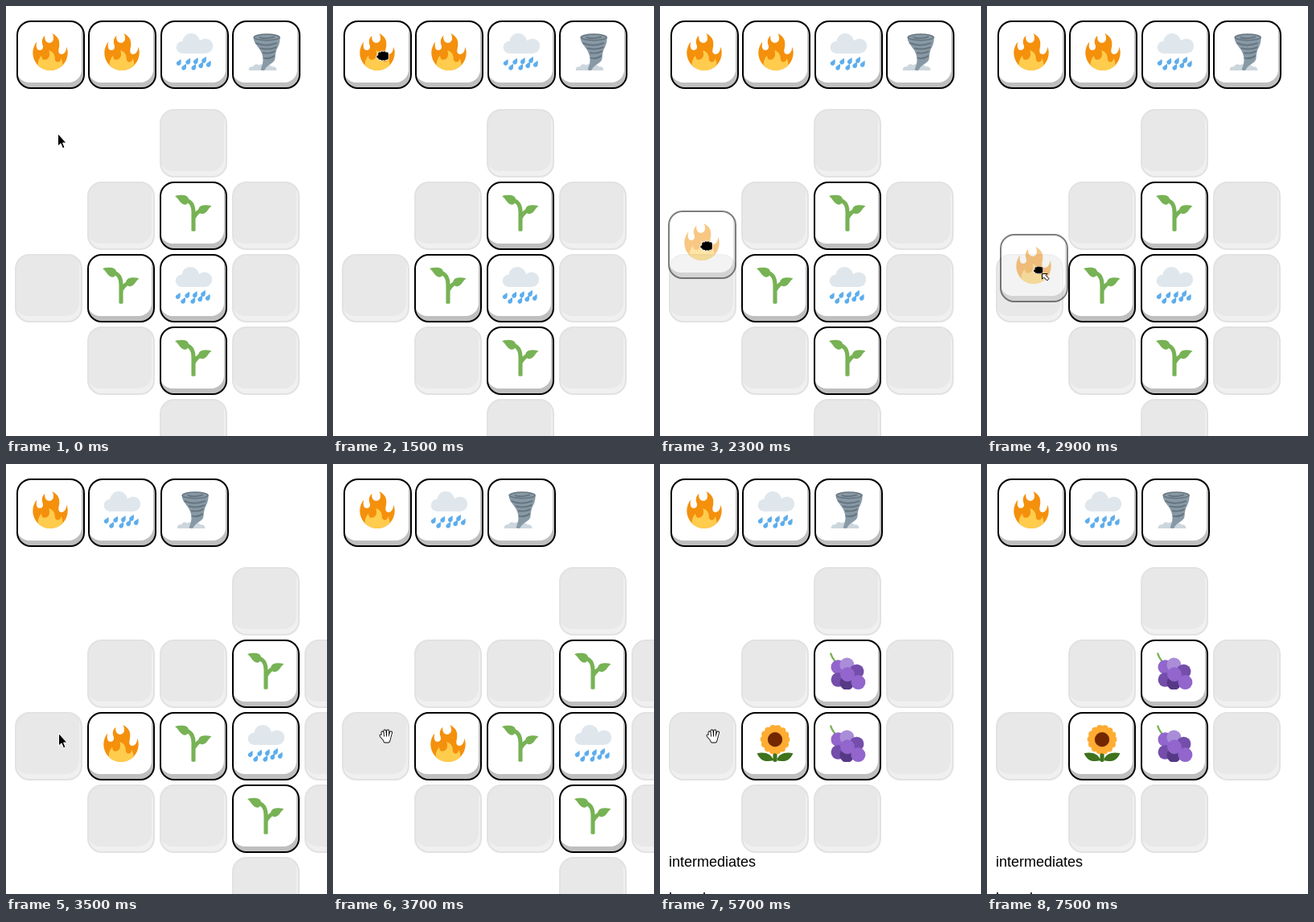
Animation, 399 px wide and 534 px high, one loop 8100 ms. Source, as an HTML page:

```html
<!DOCTYPE html>
<html lang="en">
<head>
<meta charset="utf-8">
<title>Tile garden</title>
<style>
  html, body { margin: 0; width: 100%; height: 100%; overflow: hidden; background: #fff; }
  #stage { position: relative; width: 399px; height: 534px; overflow: hidden; }
  .scene { position: absolute; inset: 0; visibility: hidden; }
  .tile {
    position: absolute; box-sizing: border-box; width: 84px; height: 85px;
    border: 2px solid #000; border-radius: 18px; background: #fff;
    box-shadow: inset -2px -6px #bfbfbf;
  }
  .tile.wide { width: 85px; }
  .tile.empty { border-color: #e2e2e2; background: #e8e8e8; box-shadow: inset -2px -6px #f0f0f0; }
  .tile svg { position: absolute; left: 17px; top: 13.5px; width: 46px; height: 46px; overflow: visible; }
  #ghost { left: 0; top: 0; opacity: .5; }
  #pointer { position: absolute; left: 0; top: 0; width: 1px; height: 1px; overflow: visible; }
  .label { position: absolute; left: 11px; font: 18px/20px "Liberation Sans", Arial, sans-serif; color: #000; }
</style>
</head>
<body>
<svg width="0" height="0" style="position:absolute">
  <defs>
    <symbol id="fire" viewBox="0 0 36 36">
      <path fill="#f4900c" d="M35 19c0-2.1-.4-4-1-5.9-.5 5.4-3.4 8.2-6.4 6.900-2.800-1.200-.9-5.900-.8-8.200.3-3.800 0-8.100-6.900-11.800 2.900 5.500.4 9-2.300 9.200-3 .2-5.700-2.600-4.700-7.100-3.200 2.400-3.300 6.400-2.300 9 1 2.700 0 5-2.600 5.200-2.800.3-4.400-3-3-8.300C2.500 11 1 14.800 1 19a17 17 0 0 0 34 0z"/>
      <path fill="#ffcc4d" d="M28.400 24c.1 3.100-2.600 4.300-4 3.700-2.100-.8-1.600-2.300-2.100-5.300s-2.600-5.100-5.700-6c2.200 6.300-1.300 8.700-3.100 9.100-1.900.4-3.800 0-4-4C7.400 23.700 6 26.700 6 30v1.100a17 17 0 0 0 24 0V30c0-2.200-.6-4.200-1.600-6z"/>
    </symbol>
    <symbol id="seedling" viewBox="0 0 36 36">
      <path fill="#77b255" d="M22.900 14.400c-1.100.7-2 1.600-2.900 2.400-.1-4.200-1.100-9.700-6.700-12.400C12.100-1.700-.8 1.400.3 2c2.300 1.200 3.600 4.100 5.100 5.700 2.600 2.800 5.600 3 7 .8 3.500 2.200 3.700 6.500 3.600 11.100V35c0 1.100 4 1.100 4 0V23.500c.5-1 2.100-3.500 4.400-5.300 1.600 1.400 4 1 6.300-1.300 1.400-1.500 2.500-4.300 4.700-5.400 1.200-.6-11.600-3.500-12.500 2.900z"/>
    </symbol>
    <symbol id="rain" viewBox="0 0 36 36">
      <g fill="#dfe7ed">
        <circle cx="15" cy="8.500" r="8.500"/><circle cx="6.300" cy="13.500" r="5.800"/>
        <circle cx="28.800" cy="12.300" r="7.300"/><path d="M6 11h22v8.500H6z"/>
      </g>
      <g id="drops" fill="#5dadec"></g>
    </symbol>
    <symbol id="tornado" viewBox="0 0 36 36">
      <path fill="#ccd6dd" d="M1.500 36c-.5-3 2-4.500 4-3.500 1-3 4.500-3 5.500-1.500 3-2 7-1 8 1 2-2 4-1 5 .5 3-1 4.500 1 4.500 3.500z"/>
      <path fill="#8899a6" d="M6 4c0 4 2 6 4 9 2.500 3 3.500 5 4.500 8 1.500 5 .5 9-1.500 14 1.500 1.500 3 1.300 4 .2 2-5 9.500-6 10-11 .2-4 1-8 2.800-11 1.500-3 2-6 2-9.200z"/>
      <ellipse cx="18.900" cy="3.800" rx="12.500" ry="3" fill="#8899a6" stroke="#66757f" stroke-width="1.200"/>
      <path fill="none" stroke="#66757f" stroke-width="1.500" stroke-linecap="round" d="M12 4q7 2 14-.5M8.500 9.500q9 4 20 0M13 14.500q8 2 15-1M15.500 19q7 1 11-1.500M16 24q6 1 10-2"/>
    </symbol>
    <symbol id="sunflower" viewBox="0 0 36 36">
      <path fill="#3e721d" d="M16 26h4v9q-2 2-4 0zM.5 27.500c7-1.500 14 0 16 7-7 2-13 .5-16-7zM35.500 27.500c-7-1.500-14 0-16 7 7 2 13 .5 16-7z"/>
      <circle cx="18" cy="14.200" r="11.200" fill="#ffac33" stroke="#ffac33" stroke-width="6.400" stroke-linecap="round" stroke-dasharray="0 5.026"/>
      <circle cx="18" cy="14.200" r="7.100" fill="#732700"/>
    </symbol>
    <symbol id="rainbow" viewBox="0 0 36 36"><g id="bands" fill="none" stroke-width="3.100"></g></symbol>
    <symbol id="grapes" viewBox="0 0 36 36">
      <path fill="none" stroke="#77b255" stroke-width="1.800" stroke-linecap="round" d="M1.800 1.200q2 6 7 10"/>
      <g id="berries"></g>
    </symbol>

    <path id="fingers" d="M-4 1-4.500-4.500M-1 0-1.500-6.500M2 0 2.200-6.500M4.500 1 6-4.500M-2.500 4-6.500-.5M-3 1.500H4.500L3 6.500H-1.500z"/>
    <path id="knuckles" d="M-4-3V3M-1-4V4M2-4V4M5-3V3M-6 1H3"/>
    <path id="arrow" stroke="#fff" d="M.5.5V16L4 12.800 6.500 18.700 9 17.600 6.600 12H11z"/>
    <g id="hand" stroke-linecap="round" stroke-linejoin="round">
      <use href="#fingers" fill="#000" stroke="#000" stroke-width="3.900"/>
      <use href="#fingers" fill="#fff" stroke="#fff" stroke-width="2.200"/>
    </g>
    <g id="fist" stroke-linecap="round" stroke-linejoin="round">
      <use href="#knuckles" stroke="#fff" stroke-width="5"/>
      <use href="#knuckles" stroke="#000" stroke-width="3.600"/>
    </g>
    <g id="drop">
      <use href="#fist" transform="scale(.78)"/>
      <path fill="#fff" stroke="#000" d="M4.500 4.500H11l-2 2 4 4-2.300 2.500-4-4-2.200 2z"/>
    </g>
  </defs>
</svg>
<div id="stage"></div>

<script>
const LOOP = 8100;
const stage = document.getElementById('stage');
const fill = (id, markup) => document.getElementById(id).innerHTML = markup;

fill('drops', [[3, 28], [8, 32.5], [12, 27], [17.5, 32.5], [19.5, 26.5], [24.5, 30.5], [27.5, 25.5], [32, 29.5]]
  .map(([x, y]) => `<path d="M${x + 2} ${y - 3}q.9 5.600-1.600 6.200c-2.500.5-3.600-2.200-2-3.700z"/>`).join(''));
fill('bands', ['#e81c27', '#f4900c', '#ffcc4d', '#5c913b', '#226699', '#9266cc'].map((color, i) => {
  const edge = 1.5 + 3 * i, r = 36 - edge;
  return `<path stroke="${color}" d="M${edge} 36A${r} ${r} 0 0 1 36 ${edge}"/>`;
}).join(''));
fill('berries', [
  [9, 14.2, '#9266cc'], [17.5, 12, '#aa8dd8'], [27, 18.5, '#744eaa'], [9, 26.5, '#744eaa'],
  [17.5, 29.5, '#553986'], [28.5, 29, '#9266cc'], [18, 21.3, '#9266cc']
].map(([x, y, color]) => `<circle cx="${x}" cy="${y}" r="7" fill="${color}"/>`).join(''));

const tile = (icon, x, y, cls = '') =>
  `<div class="tile ${cls}" style="left:${x}px;top:${y}px">` +
  (icon ? `<svg><use href="#${icon}"/></svg>` : '') + '</div>';

const label = (text, top) => `<div class="label" style="top:${top}px">${text}</div>`;

const icons = { f: 'fire', s: 'seedling', r: 'rain', t: 'tornado', o: 'sunflower', b: 'rainbow', g: 'grapes' };

// Board rows: "." is a gap, "_" an empty slot, letters are tiles.
function addScene(hand, rows, extra = '') {
  const scene = document.createElement('div');
  scene.className = 'scene';
  const held = [...hand].map((c, i) => tile(icons[c], 13 + 89.45 * i, 18, 'wide'));
  const board = rows.flatMap((row, r) => [...row].map((c, i) =>
    c === '.' ? '' : tile(icons[c], 11 + 90 * i, 128 + 90 * r, c === '_' ? 'empty' : '')));
  scene.innerHTML = held.join('') + board.join('') + extra;
  stage.append(scene);
  return scene;
}

const scenes = [
  [0, addScene('ffrt', ['.._', '._s_', '_sr_', '._s_', '.._'])],
  [3400, addScene('frt', ['..._', '.__s_', '_fsr_', '.__s_', '..._'])],
  [4700, addScene('frt', ['.._', '._s_', '_ob_', '._s_', '.._'])],
  [5700, addScene('frt', ['.._', '._g_', '_og_', '.__'], label('intermediates', 484) + label('board', 529))]
];

stage.insertAdjacentHTML('beforeend',
  '<div id="ghost" class="tile wide"><svg><use href="#fire"/></svg></div>' +
  '<svg id="pointer"><use/></svg>');
const ghost = document.getElementById('ghost');
const pointer = document.getElementById('pointer');
const pointerShape = pointer.firstChild;

// Time, pointer shape and place, then the dragged tile's place if there is one.
const poses = [
  [0, 'arrow', 64, 158],
  [600, 'arrow', 64, 150], [700, 'arrow', 64, 126], [800, 'hand', 63, 96],
  [900, 'hand', 62, 73], [1000, 'hand', 62, 62],
  [1500, 'fist', 62, 62], [1600, 'fist', 63, 72],
  [1700, 'fist', 64, 110, 15, 56], [1800, 'fist', 67, 153, 18, 96],
  [1900, 'fist', 69, 197, 21, 138], [2000, 'fist', 70, 236, 22, 178],
  [2100, 'fist', 67, 266, 19, 214], [2200, 'fist', 62, 288, 13, 241],
  [2300, 'fist', 58, 298, 10, 254],
  [2900, 'drop', 64, 328, 16, 283], [3000, 'drop', 65, 333, 17, 287],
  [3100, 'drop', 65, 335, 17, 289], [3200, 'drop', 66, 337, 17, 290],
  [3400, 'fist', 66, 337], [3500, 'arrow', 65, 334], [3700, 'hand', 66, 338],
  [7200, 'hand', 66, 300], [7300, 'arrow', 60, 190], [7400, 'hand', 49, 33],
  [7500, 'none', 0, 0]
];

const current = (track, t) => track.findLast(([start]) => start <= t);
const move = (el, x, y) => el.style.transform = `translate(${x}px, ${y}px)`;

function draw(t) {
  const active = current(scenes, t)[1];
  for (const [, scene] of scenes) scene.style.visibility = scene === active ? 'visible' : 'hidden';

  const [, shape, x, y, ghostX, ghostY] = current(poses, t);
  pointerShape.setAttribute('href', '#' + shape);
  move(pointer, x, y);
  const dragging = ghostX !== undefined;
  ghost.style.visibility = dragging ? 'visible' : 'hidden';
  if (dragging) move(ghost, ghostX, ghostY);
}

const start = performance.now();
function tick() {
  draw((performance.now() - start) % LOOP);
  requestAnimationFrame(tick);
}
tick();
</script>
</body>
</html>
```
